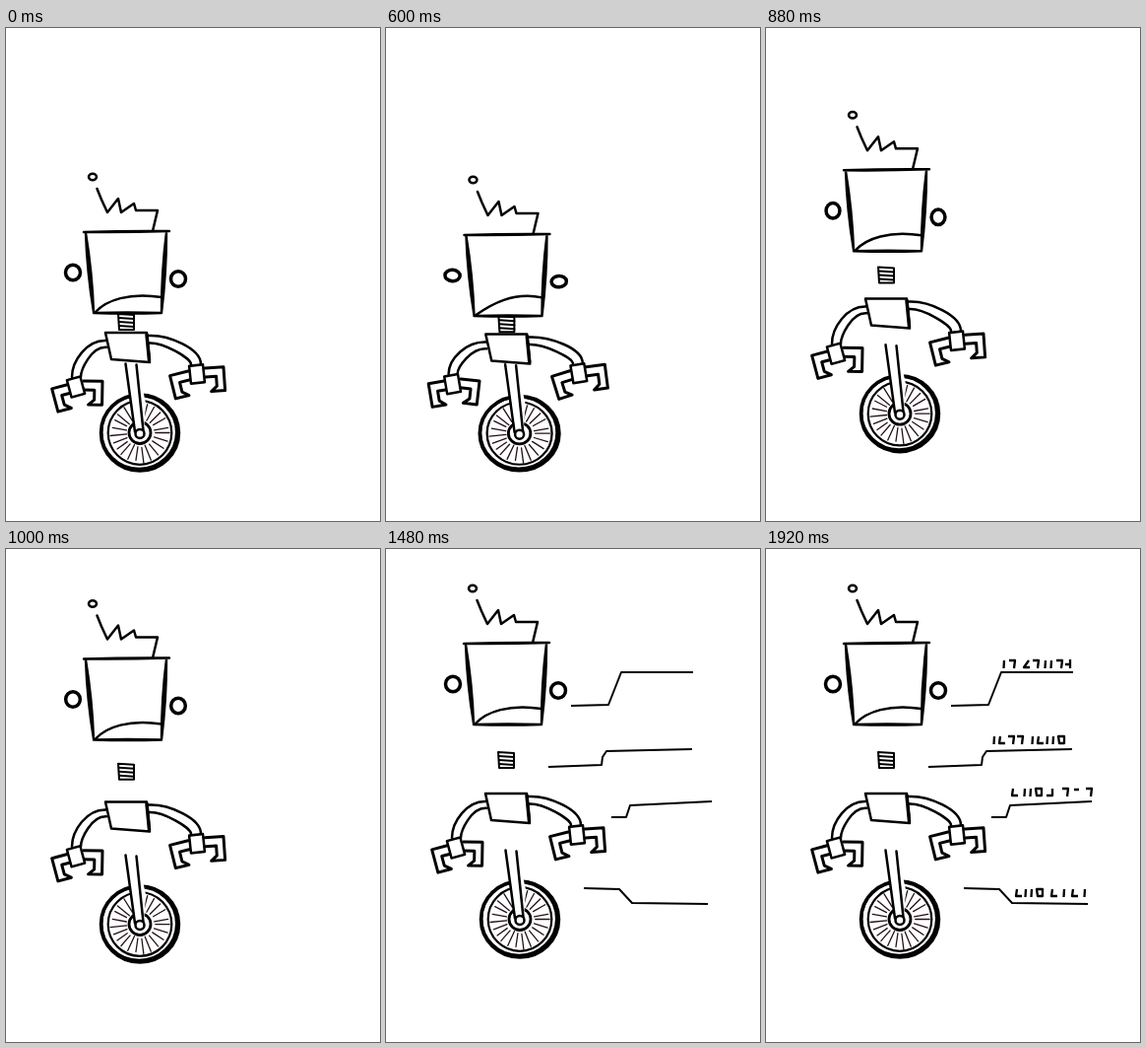
These frames come from a looping animation (380 by 500 pixels, 2400 ms). An HTML page:

```html
<!DOCTYPE html>
<html lang="en">
<head>
<meta charset="utf-8">
<title>Robot taken apart</title>
<style>
  html, body { margin: 0; width: 100%; height: 100%; overflow: hidden; background: #fff; }
  svg { display: block; width: 100vw; height: 100vh; }
  .ink { fill: none; stroke: #000; stroke-width: 2.5; stroke-linecap: round; stroke-linejoin: round; }
  .paper { fill: #fff; }
  .brush { fill: #000; stroke-width: 2.4; }
  .bold { stroke-width: 3.5; }
  .thin { stroke: #26101c; stroke-width: 1.3; }
</style>
</head>
<body>
<svg viewBox="0 0 380 500">
  <defs>
    <path id="finger" class="paper" d="M0 0H-19V24H-5L-11 19V9H0" stroke-width="3"/>
    <rect id="wrist" class="paper" x="-7" y="-9" width="14" height="18"/>
  </defs>
  <g class="ink">
    <g id="wheel">
      <g id="rim">
        <ellipse rx="39.500" ry="38.500" class="bold"/>
        <ellipse cx="-.8" cy="-.6" rx="38" ry="37"/>
        <circle r="32.300" stroke-width="2.200"/>
        <path id="spokes" class="thin"/>
        <circle r="11" stroke-width="2.800"/>
      </g>
      <path class="paper" stroke="none" d="M-14-71H-3L6-30L4 0H-4Z"/>
      <path d="M-14.500-70L-5-1M-3.500-69L3.500-2"/>
      <circle cy="1" r="4.500" class="paper"/>
    </g>
    <path id="arms"/>
    <g id="leftHand"></g>
    <g id="rightHand"></g>
    <g id="neck" stroke-width="2">
      <path class="paper" d="M114 290L130 291V306H115Z"/>
      <path id="coils"/>
    </g>
    <g id="torso">
      <path class="paper" d="M101 309H143L146 339L107 336Z"/>
      <path class="bold" d="M143 311L145.500 337"/>
    </g>
    <g id="head">
      <path d="M92.500 163L97 174L103 187L114 173L117 187L130 178L132 185H154L149 206"/>
      <ellipse cx="88" cy="151" rx="4" ry="3.200"/>
      <path class="paper" stroke="none" d="M81 207H164L158 289H89Z"/>
      <path id="headEdges" class="brush"/>
      <path id="mouth"/>
      <ellipse id="leftEye" class="bold"/>
      <ellipse id="rightEye" class="bold"/>
    </g>
    <g id="callouts" stroke-width="2" stroke-linecap="butt"></g>
    <path id="labels" stroke-width="2.300" stroke-linecap="butt"/>
  </g>
</svg>
<script>
const LOOP = 2400;
const $ = id => document.getElementById(id);
const set = (id, attrs) => {
  for (const key in attrs) $(id).setAttribute(key, attrs[key]);
};
const move = (id, x, y, turn = 0) =>
  set(id, { transform: `translate(${x} ${y}) rotate(${turn})` });
const clamp = (v, min, max) => Math.min(max, Math.max(min, v));

// 0 before start, then 1 up to count in even jumps, the last one at end
const jumps = (ms, start, end, count) =>
  clamp(1 + Math.floor((ms - start) / (end - start) * (count - 1)), 0, count);

// stroke that swells to the given width halfway
function brush(x1, y1, x2, y2, width) {
  const mx = (x1 + x2) / 2, my = (y1 + y2) / 2;
  const scale = width / Math.hypot(x2 - x1, y2 - y1);
  const nx = (y1 - y2) * scale, ny = (x2 - x1) * scale;
  return `M${x1} ${y1}Q${mx + nx} ${my + ny} ${x2} ${y2}Q${mx - nx} ${my - ny} ${x1} ${y1}`;
}

function seeded(seed) {
  return () => (seed = seed * 16807 % 2147483647) / 2147483647;
}

function buildHand(id, reach, leftTilt, rightTilt, wristTilt) {
  $(id).innerHTML = `
    <use href="#finger" transform="translate(${-reach} -3) rotate(${leftTilt})"/>
    <use href="#finger" transform="translate(8 -6) rotate(${rightTilt}) scale(-1 1)"/>
    <use href="#wrist" transform="rotate(${wristTilt})"/>`;
}

function buildSpokes(count) {
  const random = seeded(7);
  let d = '';
  for (let i = 0; i < count; i++) {
    const angle = (i + random() * .4) / count * 2 * Math.PI;
    const at = r => `${r * Math.cos(angle)} ${r * Math.sin(angle)}`;
    d += `M${at(13 + 3 * random())}L${at(31 - 3 * random())}`;
  }
  return d;
}

const glyphs = {
  '|': 'm1 0l-.5 8',
  '7': 'h6l-1 8',
  '<': 'm5 0l-5 7h6',
  'L': 'm1 0l-1 7h6',
  'J': 'm5 0v7h-6',
  'o': 'h6v7h-5z',
  '-': 'm0 1h5',
  '+': 'm0 4h5m0 -5v9'
};
// each character cell is three pixels wide
const write = (x, y, text) => [...text].map((c, i) =>
  glyphs[c] ? `M${x + i * 3} ${y}${glyphs[c]}` : '').join('');

// the first share of each line is there as soon as it appears
function addCallout(d, share) {
  const path = document.createElementNS('http://www.w3.org/2000/svg', 'path');
  path.setAttribute('d', d);
  $('callouts').append(path);
  const length = path.getTotalLength();
  return progress => path.setAttribute('stroke-dasharray',
    `${(share + (1 - share) * progress) * length + .01} 999`);
}

buildHand('leftHand', 6, -15, 1, -15);
buildHand('rightHand', 9, -14, -4, -6);
set('spokes', { d: buildSpokes(23) });
set('coils', { d: [294, 298, 302].map(y => `M115 ${y}L130 ${y + 1}`).join('') });
set('headEdges', {
  d: brush(79, 207, 166, 206, 1) + brush(81, 208, 89, 288, 2.6) +
     brush(163, 207, 158, 289, 2.6) + brush(89, 289, 158, 289, 1)
});
set('labels', {
  d: write(241, 113, '|.7....<..7...|.|.7..+') +
     write(231, 190, '|.L..7..7....|.L..|.|.o') +
     write(250, 243, 'L...|.|.o...J....7...-...7') +
     write(254, 345, 'L..|.|.o....L...|..L...|')
});
const callouts = [
  addCallout('M188 159L226 158L239 125H312', .4),
  addCallout('M165 221L219 219L220 211L224 205L311 203', .4),
  addCallout('M229 272H244L248 260L331 256', .2),
  addCallout('M201 344L237 345L250 359L327 360', .34)
];

function drawEye(id, cx, cy, tilt, squash, closed) {
  set(id, {
    cx, cy,
    rx: 7.5 + (squash < 0 ? 5 * squash : .5 * closed),
    ry: Math.max(.3, 7.7 * (1 - closed)),
    transform: `rotate(${tilt * closed} ${cx} ${cy})`
  });
}

// two parallel lines from the shoulder bending down to the wrist
function arm(x, y, side, [handX, handY], width) {
  let d = '';
  for (const inset of [0, width]) {
    const endX = handX - side * (inset - 4);
    const topY = y + inset * .75;
    d += `M${x} ${topY}C${x + side * (20 - inset / 2)} ${topY - 1} ` +
         `${endX} ${handY - 26 + inset} ${endX} ${handY - 10}`;
  }
  return d;
}

function draw(ms) {
  const ducking = jumps(ms, 520, 720, 4);
  const rising = jumps(ms, 880, 1080, 4);
  const explode = 1 - (1 - rising / 4) ** 2.8;
  const duck = ducking && 1 - 1.25 * ((4 - ducking) / 3) ** 1.3;
  const squash = rising ? -.25 * (1 - explode) : duck;
  const low = Math.max(0, squash);

  const torsoY = 6 * squash - 61 * explode;
  const left = [71 - 13 * low, 364 - 11 * low - 61 * explode];
  const right = [194 + 7 * low, 351 - 3 * low - 61 * explode];

  move('head', 1.8 * low, 11.5 * squash - 111 * explode);
  move('neck', 1.5 * low, 9 * squash - 84 * explode);
  move('torso', low, torsoY);
  move('leftHand', ...left, 21 * low);
  move('rightHand', ...right, -13 * low);
  move('wheel', 136 - 1.5 * low, 410.5 + 2.5 * low - 35 * explode);
  set('rim', { transform: `scale(${1 + .08 * low} ${1 - .08 * low})` });
  set('arms', {
    d: arm(102, 317 + torsoY, -1, left, 9) + arm(145, 312 + torsoY, 1, right, 10)
  });
  set('mouth', {
    d: `M91 288C${102 + 16 * low} ${276 + 5 * low} ` +
       `${125 + 15 * low} ${268 - 15 * low} 158 ${273 - 10 * low}`
  });
  drawEye('leftEye', 68 - 3.5 * low, 248, 13, squash, low);
  drawEye('rightEye', 175 + low, 254.5 - 1.5 * low, -15, squash, low);

  const drawing = jumps(ms, 1240, 1400, 3);
  $('callouts').style.display = drawing ? '' : 'none';
  callouts.forEach(reveal => reveal(Math.max(0, drawing - 1) / 2));

  const blink = ms < 1840 ? 80 : 40;
  const lit = ms >= 1920 || Math.floor((ms - 1520) / blink) % 2 === 0;
  $('labels').style.display = ms >= 1520 && lit ? '' : 'none';
}

const begin = performance.now();
function tick() {
  draw((performance.now() - begin) % LOOP);
  requestAnimationFrame(tick);
}
tick();
</script>
</body>
</html>
```
